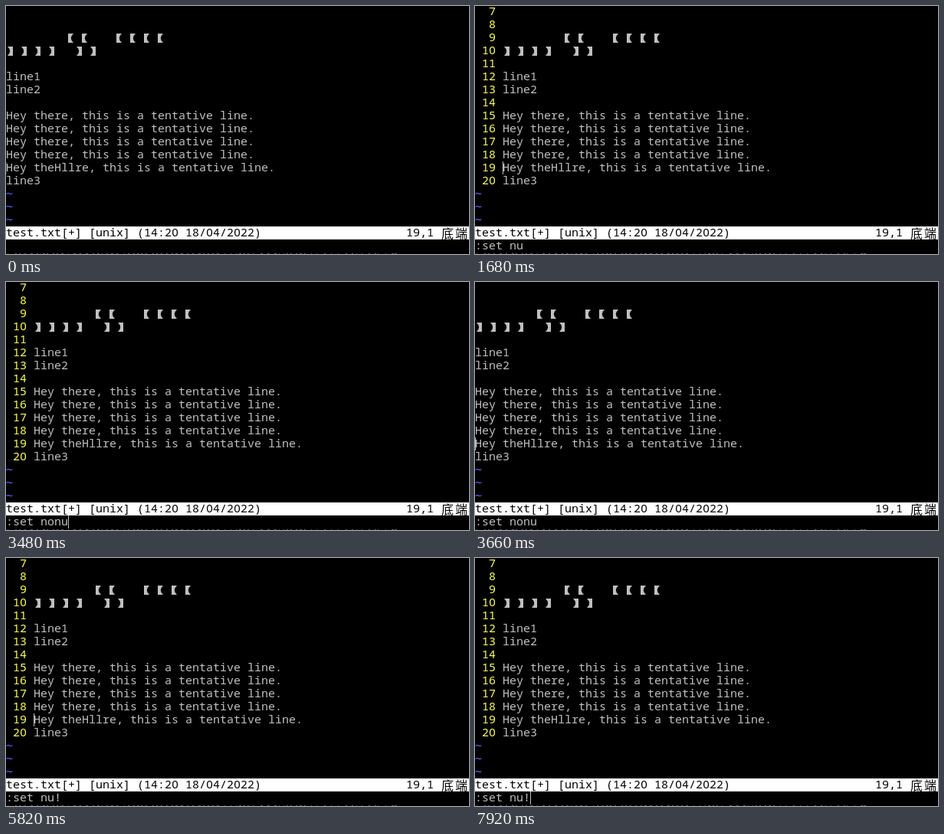
An HTML page with a canvas for the animation above (8000 ms loop, 604x324 px).

```html
<!DOCTYPE html>
<html lang="en">
<head>
<meta charset="utf-8">
<title>Line numbers in the editor</title>
<style>
  html, body { margin: 0; width: 100%; height: 100%; overflow: hidden; background: #000; }
  canvas { display: block; }
</style>
</head>
<body>
<canvas id="stage" width="604" height="324"></canvas>
<script>
const ctx = document.getElementById('stage').getContext('2d');
const LOOP = 8000, CELL = 9, ROW = 17, TOP = -1, BASE = 13;
const GREY = '#c0c0c0', YELLOW = '#ffff55', BLUE = '#5c5cff';
const MONO = '500 15px "Noto Sans Mono", "DejaVu Sans Mono", monospace';
const HAN = '300 16px "Noto Sans CJK SC", "Noto Sans CJK", sans-serif';
// A zero without a slash and a wide tilde come from other faces.
const FACES = {
  '0': '500 15px "Noto Sans", sans-serif',
  '~': '15px "DejaVu Sans Mono", monospace'
};

const hey = 'Hey there, this is a tentative line.';
const lines = ['', '', '        【【   【【【【', '】】】】  】】', '', 'line1', 'line2', '',
  hey, hey, hey, hey, 'Hey theHllre, this is a tentative line.', 'line3'];
const FIRST = 7, CURSOR_ROW = 12, STATUS_ROW = 17, COMMAND_ROW = 18;

// [time, command text, numbers shown, cursor: 'cmd' | 'text' | 'faint' | '']
const steps = [[0, '', false, 'faint'], [240, '', false, 'text']];

function show(t, text, numbers, cursor) {
  steps.push([t, text, numbers, cursor]);
}
// Types the command one character per given time.
function type(text, times, numbers) {
  times.forEach((t, i) => show(t, text.slice(0, i + 1), numbers, 'cmd'));
}

type(':set nu', [720, 840, 1020, 1140, 1200, 1320, 1500], false);
show(1680, ':set nu', true, 'text');
type(':set nonu', [2220, 2340, 2460, 2760, 2940, 3060, 3240, 3360, 3480], true);
show(3660, ':set nonu', false, 'text');
show(4200, ':set nonu', false, '');
type(':set nu!', [4320, 4500, 4680, 4920, 5100, 5220, 5400, 5580], false);
show(5760, ':set nu!', true, '');
show(5820, ':set nu!', true, 'text');
show(6300, ':set nu!', true, '');
type(':set', [6600, 6840, 6960, 7140], true);
show(7440, ':se', true, 'cmd');
show(7500, ':set', true, 'cmd');
show(7920, ':set nu!', true, 'cmd');

function rect(x, y, w, h, color) {
  ctx.fillStyle = color;
  ctx.fillRect(x, y, w, h);
}

// Solid lenticular bracket in a double-width cell.
function bracket(x, y, open) {
  ctx.save();
  ctx.translate(open ? x : x + 18, y);
  if (!open) ctx.scale(-1, 1);
  ctx.beginPath();
  ctx.moveTo(9, 3);
  ctx.lineTo(16, 3);
  ctx.quadraticCurveTo(9.5, 9, 16, 15);
  ctx.lineTo(9, 15);
  ctx.fill();
  ctx.restore();
}

function write(text, x, row, color) {
  const y = TOP + row * ROW;
  ctx.fillStyle = color;
  ctx.textAlign = 'center';
  for (const ch of text) {
    const wide = ch > '\u2fff', width = wide ? 2 * CELL : CELL;
    if (ch === '【' || ch === '】') {
      bracket(x, y, ch === '【');
    } else if (ch !== ' ') {
      ctx.font = wide ? HAN : FACES[ch] || MONO;
      ctx.fillText(ch, x + width / 2, y + BASE + (wide ? 2 : 0));
    }
    x += width;
  }
}

function caret(x, row, faint) {
  const y = TOP + row * ROW;
  if (!faint) return rect(x, y, 1, ROW, GREY);
  for (let i = 1; i < ROW; i += 2) rect(x, y + i, 1, 1, '#808080');
}

// Sliver of whatever lies below the window.
function edge() {
  let seed = 7;
  const random = () => (seed = seed * 16807 % 2147483647) / 2147483647;
  for (let x = 2; x < 510; x += 4 + random() * 6) {
    rect(Math.round(x), 323, 1 + Math.round(random() * 2), 1, '#5c5c5c');
  }
}

function draw(t) {
  const [, command, numbers, cursor] = steps.findLast(s => s[0] <= t);
  const left = numbers ? 4 * CELL : 0;
  rect(0, 0, 604, 324, '#000');
  lines.forEach((line, row) => {
    if (numbers) write(String(FIRST + row).padStart(3), 0, row, YELLOW);
    write(line, left, row, GREY);
  });
  for (let row = lines.length; row < STATUS_ROW; row++) write('~', 0, row, BLUE);
  rect(0, TOP + STATUS_ROW * ROW, 604, ROW, '#fff');
  write('test.txt[+] [unix] (14:20 18/04/2022)', 0, STATUS_ROW, '#000');
  write('19,1 底端', 58 * CELL, STATUS_ROW, '#000');
  write(command, 0, COMMAND_ROW, GREY);
  edge();
  if (cursor === 'cmd') caret(command.length * CELL, COMMAND_ROW);
  else if (cursor) caret(left, CURSOR_ROW, cursor === 'faint');
}

const start = performance.now();
function tick() {
  draw((performance.now() - start) % LOOP);
  requestAnimationFrame(tick);
}
tick();
</script>
</body>
</html>
```
